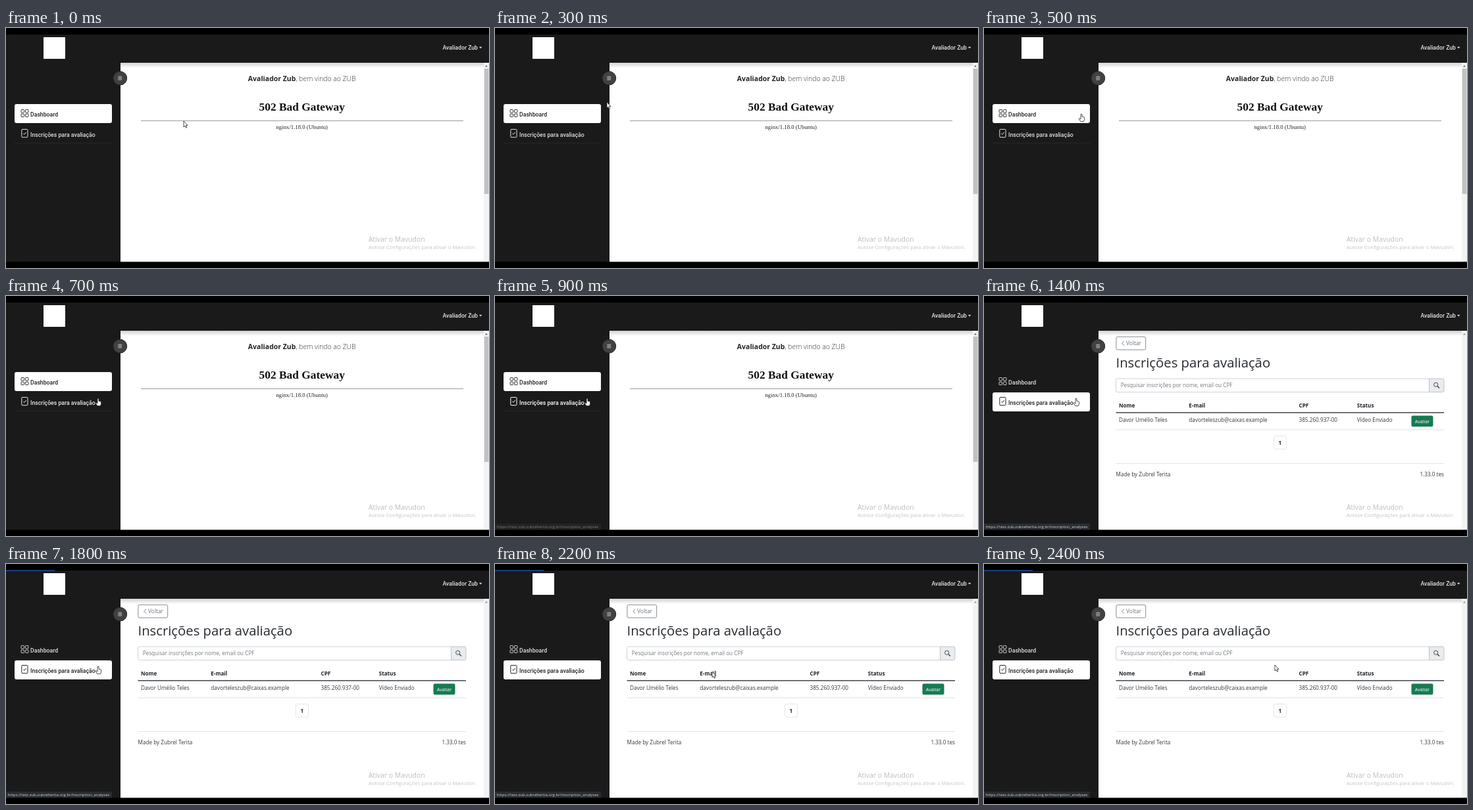
An HTML page with a canvas for the animation above (2500 ms loop, 734 px wide and 366 px high).

```html
<!DOCTYPE html>
<html lang="pt-BR">
<head>
<meta charset="utf-8">
<title>Inscrições para avaliação</title>
<style>
html, body { margin: 0; width: 100%; height: 100%; overflow: hidden; background: #000; }
canvas { display: block; }
</style>
</head>
<body>
<canvas id="stage" width="734" height="366"></canvas>
<script>
const ctx = document.getElementById('stage').getContext('2d');
const LOOP = 2500, STEP = 100;
const SANS = '"Open Sans", "Noto Sans", sans-serif';
const ROBOTO = 'Roboto, sans-serif';
const SERIF = '"Liberation Serif", serif';
const USER = 'Avaliador Zub';
const DARK = '#1a1a1a';

// Cursor path: time, x, y of the hot spot
const PATH = [
  [0, 270, 142], [100, 241, 130], [200, 202, 118], [300, 170, 113],
  [400, 158, 119], [500, 148, 131], [600, 143, 143], [700, 140, 156],
  [2000, 140, 156], [2100, 215, 162], [2200, 330, 164], [2300, 410, 158], [2400, 442, 154]
];

function text(str, x, y, size, color, { weight = 400, family = SANS, align = 'left' } = {}) {
  ctx.font = `${weight} ${size}px ${family}`;
  ctx.textAlign = align;
  ctx.fillStyle = color;
  ctx.fillText(str, x, y);
  return ctx.measureText(str).width;
}

function rect(x, y, w, h, fill) {
  ctx.fillStyle = fill;
  ctx.fillRect(x, y, w, h);
}

function box(x, y, w, h, r, fill, stroke, line = 1) {
  ctx.beginPath();
  ctx.roundRect(x, y, w, h, r);
  if (fill) { ctx.fillStyle = fill; ctx.fill(); }
  if (stroke) { ctx.strokeStyle = stroke; ctx.lineWidth = line; ctx.stroke(); }
}

function lines(points, color, width = 1) {
  ctx.beginPath();
  points.forEach(([x, y], i) => i ? ctx.lineTo(x, y) : ctx.moveTo(x, y));
  ctx.strokeStyle = color;
  ctx.lineWidth = width;
  ctx.stroke();
}

function triangle(x, y, w, h, color) {
  ctx.beginPath();
  ctx.moveTo(x - w / 2, y);
  ctx.lineTo(x + w / 2, y);
  ctx.lineTo(x, y + h);
  ctx.fillStyle = color;
  ctx.fill();
}

function fade(t, from, to) {
  return Math.min(1, Math.max(0, (t - from) / (to - from)));
}

function drawFrame() {
  rect(0, 0, 734, 366, '#000');
  rect(0, 10, 734, 346.5, DARK);
  rect(174, 53, 552, 303.5, '#fff');
  const shadow = ctx.createLinearGradient(0, 53, 0, 61);
  shadow.addColorStop(0, '#d2d2d2');
  shadow.addColorStop(1, '#ffffff');
  rect(174, 53, 552, 8, shadow);

  rect(57, 14, 33, 33, '#fff');

  text(USER, 717, 33.3, 8.7, '#e4e4e4', { weight: 500, family: ROBOTO, align: 'right' });
  triangle(721.2, 28.8, 4.6, 2.5, '#e4e4e4');
}

function drawScrollbar(hasThumb) {
  rect(726, 53, 8, 303.5, '#f3f3f3');
  triangle(730, 59.3, 4, -2.6, hasThumb ? '#666' : '#8c8c8c');
  if (hasThumb) rect(726.8, 62, 6.6, 191, '#c1c1c1');
}

function drawGridIcon(color) {
  for (const x of [23, 29.5])
    for (const y of [124.5, 131]) box(x, y, 4.5, 4.5, 0.8, null, color, 0.9);
}

function drawCheckIcon(color) {
  box(23.8, 154.5, 9.2, 12.2, 1.2, null, color, 1);
  lines([[26.2, 160.8], [27.8, 162.3], [30.7, 159]], color, 1);
}

function drawSidebar(t, onList) {
  const glow = Math.round(222 + 33 * fade(t, 600, 900));
  const idle = `rgb(${glow},${glow},${glow})`;
  const style = { weight: 500, family: ROBOTO };
  const first = onList ? '#dedede' : '#222';
  const second = onList ? '#222' : idle;

  rect(13, onList ? 144.5 : 175, 148, 1, '#272727');
  box(13, onList ? 147 : 116, 148, 29, 3, '#fff');
  drawGridIcon(first);
  text('Dashboard', 37, 134.6, 8.7, first, style);
  drawCheckIcon(second);
  text('Inscrições para avaliação', 37, 165.5, 8.7, second, style);
}

function drawMenuButton() {
  ctx.beginPath();
  ctx.arc(173.3, 76.6, 10.4, 0, Math.PI * 2);
  ctx.fillStyle = '#414141';
  ctx.fill();
  ctx.strokeStyle = '#242424';
  ctx.lineWidth = 1;
  ctx.stroke();
  for (const y of [74.2, 76.5, 78.8]) lines([[170.3, y], [176.2, y]], '#ddd', 0.9);
}

function drawWelcome() {
  const rest = ', bem vindo ao ZUB';
  ctx.font = `700 10.5px ${SANS}`;
  const nameWidth = ctx.measureText(USER).width;
  ctx.font = `300 10.4px ${SANS}`;
  const left = 449.7 - (nameWidth + ctx.measureText(rest).width) / 2;
  text(USER, left, 81, 10.5, '#212529', { weight: 700 });
  text(rest, left + nameWidth, 81, 10.4, '#333', { weight: 300 });

  text('502 Bad Gateway', 449.7, 125.5, 17.4, '#111', { weight: 700, family: SERIF, align: 'center' });
  rect(205, 141, 490, 1, '#9a9e9a');
  text('nginx/1.18.0 (Ubuntu)', 449.7, 154.3, 8.75, '#222', { family: SERIF, align: 'center' });
}

function drawList() {
  const ink = '#343a40';
  box(200.9, 62.2, 44.8, 19.8, 2.5, '#fff', '#858b90', 1);
  lines([[213, 68.8], [209.6, 72.2], [213, 75.6]], '#6c757d', 0.9);
  text('Voltar', 216, 75.3, 8.4, '#6c757d');
  text('Inscrições para avaliação', 200.5, 108.5, 20.3, '#272b30');

  box(200.5, 126, 476, 20.5, [2.5, 0, 0, 2.5], '#fff', '#ced2d6', 1);
  box(676.5, 126, 22.5, 20.5, [0, 2.5, 2.5, 0], '#e9ecef', '#bfc3c7', 1);
  text('Pesquisar inscrições por nome, email ou CPF', 207.7, 139.2, 8.17, '#747b82');
  ctx.beginPath();
  ctx.arc(686.7, 135.2, 3.1, 0, Math.PI * 2);
  ctx.strokeStyle = '#343a40';
  ctx.lineWidth = 0.9;
  ctx.stroke();
  lines([[689, 137.5], [692, 140.5]], '#343a40', 1.2);

  const columns = [
    [205, 'Nome', 'Davor Umélio Teles'],
    [311.3, 'E-mail', 'davorteleszub@caixas.example'],
    [478.5, 'CPF', '385.260.937-00'],
    [566.7, 'Status', 'Vídeo Enviado']
  ];
  for (const [x, head, value] of columns) {
    text(head, x, 169.5, 8.1, '#212529', { weight: 700 });
    text(value, x, 192.3, 8.2, ink);
  }
  rect(200.5, 177.2, 498.5, 1.3, '#26292c');
  rect(200.5, 203.5, 498.5, 1, '#dcdfe2');
  box(649.5, 182.5, 33, 16.8, 2.2, '#177b52');
  text('Avaliar', 666, 193.6, 7.1, '#fff', { align: 'center' });

  box(440.5, 213.5, 19, 20, 2.5, '#fff', '#e3e6e9', 1);
  text('1', 449.8, 226.8, 8.2, '#212529', { weight: 700, align: 'center' });
  rect(200.5, 255, 498.5, 1, '#e2e4e6');
  text('Made by Zubrel Terita', 200.5, 274.6, 8.2, ink);
  text('1.33.0 tes', 699, 274.6, 8.2, ink, { align: 'right' });
}

function drawWatermark() {
  text('Ativar o Mavudon', 551, 325.7, 10.4, '#bdbdbd');
  text('Acesse Configurações para ativar o Mavudon.', 551, 337, 7.74, '#c3c3c3');
}

function drawStatus(t) {
  ctx.globalAlpha = fade(t, 800, 1000);
  rect(0, 347, 161, 9.5, '#292c30');
  text('https://test.zub.zubrelterita.org.br/inscription_analyses', 2.7, 354.2, 6.05, '#d0d3d6');
  ctx.globalAlpha = 1;
}

function shape(points, x, y, fill, stroke) {
  ctx.beginPath();
  points.forEach(([dx, dy]) => ctx.lineTo(x + dx, y + dy));
  ctx.closePath();
  ctx.lineJoin = 'round';
  ctx.fillStyle = fill;
  ctx.fill();
  ctx.strokeStyle = stroke;
  ctx.lineWidth = 0.8;
  ctx.stroke();
}

function drawCursor(t) {
  const i = PATH.findLastIndex(p => p[0] <= t);
  const a = PATH[i], b = PATH[i + 1] || a;
  const k = b === a ? 0 : (t - a[0]) / (b[0] - a[0]);
  const x = a[1] + (b[1] - a[1]) * k, y = a[2] + (b[2] - a[2]) * k;
  const overLink = x < 161 && y > 116;
  if (overLink) {
    shape([[-1, 0.6], [0, 0], [1, 0.6], [1, 4.2], [3.2, 4.6], [4.6, 5.4], [4.6, 8.6],
      [3.4, 11.6], [-1.2, 11.6], [-3.8, 7.6], [-3.2, 6.6], [-1, 8]], x, y, '#fff', '#222');
  } else {
    shape([[0, 0], [0, 9], [2, 7.2], [3.4, 10.3], [4.8, 9.6], [3.5, 6.6], [6, 6.4]], x, y, '#fff', '#222');
  }
}

function draw(now) {
  const t = Math.floor((now % LOOP) / STEP) * STEP;
  const onList = t >= 1400;
  drawFrame();
  drawScrollbar(!onList);
  drawSidebar(t, onList);
  onList ? drawList() : drawWelcome();
  drawMenuButton();
  drawWatermark();
  drawStatus(t);
  if (t >= 1800) rect(0, 9, 74, 2, '#1d3f80');
  drawCursor(t);
}

const start = performance.now();
function tick() {
  draw(performance.now() - start);
  requestAnimationFrame(tick);
}
tick();
</script>
</body>
</html>
```
